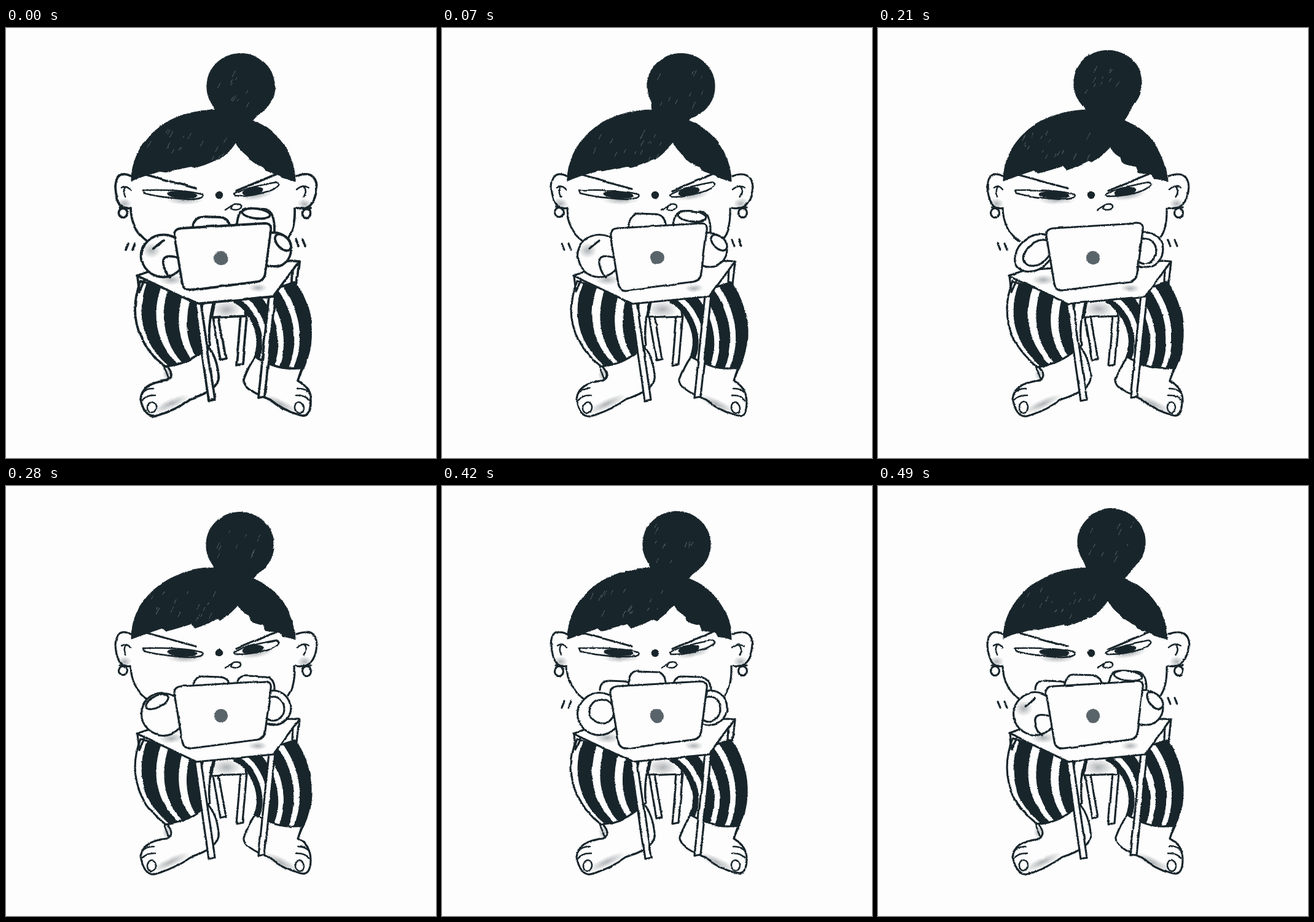
Animation of 700x700 px, one loop 560 ms. Source, as an HTML page:

```html
<!DOCTYPE html>
<html lang="en">
<head>
<meta charset="utf-8">
<title>Typing</title>
<style>
  html, body { margin: 0; width: 100%; height: 100%; overflow: hidden; background: #fdfdfd; }
  svg { display: block; width: 100vw; height: 100vh; }
  path, ellipse { fill: #fdfdfd; stroke: #18252b; stroke-width: var(--w, 3.2px); stroke-linecap: round; stroke-linejoin: round; }
  .line { fill: none; }
  .thin { stroke-width: 2.5px; }
  .ink { fill: #18252b; stroke-width: 1.2px; }
  .shade { fill: url(#smudge); stroke: none; }
  .fleck { fill: none; stroke: #a8b1b4; stroke-width: .9px; opacity: .5; }
  .badge { fill: #59646a; stroke: none; }
  .frame { visibility: hidden; animation: show 560ms step-end infinite; animation-delay: calc((var(--i) - 8) * 70ms); }
  @keyframes show { 0% { visibility: visible } 12.5%, 100% { visibility: hidden } }
</style>
</head>
<body>
<svg id="stage" viewBox="0 0 700 700">
  <radialGradient id="smudge">
    <stop offset="0" stop-color="#18252b" stop-opacity=".34"/>
    <stop offset="1" stop-color="#18252b" stop-opacity="0"/>
  </radialGradient>
</svg>
<script>
const path = (d, cls = '') => `<path class="${cls}" d="${d}"/>`;
const oval = (x, y, rx, ry, tilt = 0, cls = '') =>
  `<ellipse class="${cls}" cx="${x}" cy="${y}" rx="${rx}" ry="${ry}" transform="rotate(${tilt} ${x} ${y})"/>`;
const shade = (x, y, rx, ry, tilt) => oval(x, y, rx, ry, tilt, 'shade');
const range = n => [...Array(n).keys()];
const mix = (a, b, u) => a.map((v, k) => v + (b[k] - v) * u);
const polyline = points => 'M' + points.join('L');

function bezier([a, b, c, d], t) {
  const s = 1 - t;
  return a.map((_, k) => s * s * s * a[k] + 3 * s * s * t * b[k] + 3 * s * t * t * c[k] + t * t * t * d[k]);
}

function randomFrom(seed) {
  return () => (seed = seed * 16807 % 2147483647) / 2147483647;
}

// A straight furniture leg, drawn as a bar of constant width.
const bar = (x, top, foot, bottom, width) =>
  path(`M${x} ${top}L${foot} ${bottom}L${foot + width} ${bottom - 2}L${x + width} ${top}Z`);

// Striped trouser leg: each stripe lies between two blends of the outer and inner edge.
function trouserLeg(outer, inner, firstStripe) {
  const at = (u, t) => {
    const [x, y] = mix(bezier(outer, t), bezier(inner, t), u);
    return [x, y + 8 * t * Math.sin(Math.PI * u)];
  };
  const band = (u0, u1, cls) => {
    const steps = range(13).map(k => k / 12);
    const hem = steps.map(s => at(u0 + (u1 - u0) * s, 1));
    const back = steps.map(s => at(u1, 1 - s));
    return path(polyline([...steps.map(t => at(u0, t)), ...hem, ...back]) + 'Z', cls);
  };
  const stripes = range(4).map(k => firstStripe + .3 * k).map(u => band(u, Math.min(1, u + .185), 'ink'));
  return band(0, 1) + stripes.join('');
}

const trousers =
  trouserLeg([[219, 412], [202, 455], [206, 510], [259, 551]], [[338, 446], [332, 470], [329, 495], [332, 516]], .09) +
  trouserLeg([[470, 414], [496, 450], [506, 505], [484, 553]], [[372, 446], [395, 455], [420, 500], [405, 535]], .01);

const seat =
  bar(337, 470, 349, 541, 9) + bar(382, 468, 375, 550, 10) +
  path('M340 446L335 471L391 469L388 446') + shade(359, 458, 24, 14) +
  path('M257 551L266 574M484 553L474 576', 'thin') + shade(262, 563, 7, 12);

const toes =
  path('M222 594Q229 586 241 587M222 606Q228 597 243 598', 'line thin') +
  oval(237, 618, 7, 9, 10, 'thin') + shade(268, 612, 34, 8, -25);

const feet =
  path('M262 551Q276 567 262 574Q222 578 219 604Q225 634 242 632Q272 624 300 604Q350 588 346 565Q343 535 329 519') +
  path('M482 553L475 574Q496 586 496 608Q496 636 478 630Q450 622 430 605Q385 588 387 572Q395 550 405 536') +
  toes + `<g transform="translate(715 0) scale(-1 1)">${toes}</g>`;

const table =
  bar(307, 446, 330, 607, 10) + bar(428, 436, 411, 602, 10) +
  path('M214 404L217 429L225 411M477 381L473 417M467 393L466 413', 'line') +
  path('M213 403L240 394L465 379L477 380L435 437L310 449Z') +
  shade(269, 410, 20, 9) + shade(410, 423, 15, 7);

// An ear grows from its root on the face by a signed reach.
function ear(root, reach) {
  const x = f => root + reach * f;
  return path(`M${root} 241Q${x(.95)} 230 ${x(1)} 259Q${x(.9)} 298 ${root} 293`) +
    path(`M${x(.6)} 260Q${x(.3)} 254 ${root} 263M${x(.35)} 258Q${x(.55)} 265 ${x(.35)} 275`, 'line thin') +
    shade(x(.4), 286, 12, 9) + oval(x(.5), 301, 7, 7.5) +
    path(`M${x(.7)} 292L${x(.25)} 293`, 'line');
}

const face =
  path('M203 294Q204 328 230 347M470 294Q471 325 460 341', 'line') + ear(203, -25) + ear(473, 33) +
  shade(291, 280, 30, 8) + shade(408, 272, 28, 8, -10) +
  path('M225 238L309 261M375 265L440 238', 'line') +
  path('M223 264Q290 262 320 271Q324 278 300 279Q250 276 225 269Z', 'thin') + oval(287, 271.5, 24, 5.5, 4, 'ink') +
  path('M371 271Q385 261 440 251Q452 255 430 265Q400 275 373 274Z', 'thin') + oval(402, 266, 17, 6, -10, 'ink') +
  oval(347, 272, 5.6, 5.6, 0, 'ink') +
  path('M357 296L371 287Q383 285 382 292Q376 299 366 294L368 290', 'thin');

const laptop =
  path('M286 326L421 318Q433 318 431 330L422 399Q421 411 409 413L302 427Q289 428 287 416L274 338Q273 327 286 326Z') +
  oval(350, 374, 11, 11, 0, 'badge');

// The fringe follows two curves meeting at the parting; strands add a sawtooth.
function hair(parting, strand) {
  const right = [[471, 250], [440, 240], [396, 222], parting];
  const left = [parting, [340, 242], [270, 217], [204, 249]];
  const fringe = curve => range(29).map(k => {
    const t = k / 28;
    const [x, y] = bezier(curve, t);
    return [x, y + strand * (k % 7 / 6 - .4) * Math.sin(Math.PI * t)];
  });
  return path(`M204 249C204 190 255 134 345 133L375 146C420 146 470 190 471 250L${[...fringe(right), ...fringe(left)].join('L')}Z`, 'ink');
}

const bun = ([dx, dy]) => oval(382 + dx, 95 + dy, 55, 53.5, 0, 'ink') +
  path(`M${334 + dx} ${118 + dy}Q341 138 345 148L402 150Q408 142 ${425 + dx} ${128 + dy}Z`, 'ink');

// Pale pencil gaps left in the dark hair.
function flecks(seed, [dx, dy]) {
  const rnd = randomFrom(seed);
  return path(range(26).map(i => {
    const [x, y] = i < 10 ? [348 + dx + rnd() * 70, 62 + dy + rnd() * 60] : [235 + rnd() * 125, 165 + rnd() * 45];
    const length = 3 + rnd() * 8;
    return `M${x} ${y}l${-length / 2} ${length}`;
  }).join(''), 'fleck');
}

const finger = (x0, x1, top) =>
  path(`M${x0} 332Q${x0 + 1} ${top} ${x0 + 16} ${top}L${x1 - 16} ${top + 1}Q${x1 + 1} ${top + 3} ${x1} 332`);

// Fingers show above the lid by their lift; with none lifted the hands lie flat.
function hands({ left, right, grip, back }) {
  const flat = !left;
  const innerLeft = {
    thumb: path('M284 375Q250 364 257 388Q260 400 267 406M240 359L256 346', 'line') + shade(237, 362, 15, 13),
    nail: oval(246, 351, 20, 9, -28),
    loop: flat ? oval(260, 366, 26, 17, -40) : oval(260, 367, 20, 20)
  }[grip];
  const innerRight = grip === 'thumb' ? oval(451, 349, 16, 9.5, 46) : oval(435, 363, 18, 20);
  return (back ? finger(257, 312, 317) : '') +
    (left ? finger(303, 365, 322 - left) : '') +
    (right ? finger(375, 437, 318 - right) : '') +
    (right > 16 ? oval(407, 326 - right, 23, 8, 7) : '') +
    (flat ? oval(255, 366, 36, 26, -40) : oval(256, 371, 35.5, 34.5)) + innerLeft +
    oval(436, 361, 28, 28) + innerRight;
}

const ticks = (x, y, lean) => lean
  ? path(range(2).map(k => `M${x + k * 11 - 2 * lean} ${y - 5}l${4 * lean} 10`).join(''), 'line')
  : '';

const frames = [
  { left: 15, right: 24, grip: 'thumb', shake: [-1, 1], bun: [0, 0], width: 3.8 },
  { left: 20, right: 19, grip: 'thumb', shake: [1, 1], bun: [7, 0] },
  { left: 12, right: 9, grip: 'nail', shake: [0, 0], bun: [1, -2] },
  { left: 0, right: 0, grip: 'loop', shake: [1, 1], bun: [-8, -5] },
  { left: 12, right: 9, grip: 'nail', shake: [0, 0], bun: [-1, 1] },
  { left: 20, right: 19, grip: 'thumb', shake: [1, 1], bun: [3, 0] },
  { left: 21, right: 8, grip: 'loop', shake: [-1, 0], bun: [0, 0], back: true },
  { left: 15, right: 17, grip: 'thumb', shake: [1, 1], bun: [-2, -4], back: true }
];

// Opaque noise keeps the displacement centred, so lines roughen without drifting.
const roughen = (input, frequency, seed, scale) => `
  <feTurbulence type="fractalNoise" baseFrequency="${frequency}" numOctaves="2" seed="${seed}"/>
  <feColorMatrix values="1 0 0 0 0  0 1 0 0 0  0 0 1 0 0  0 0 0 0 1" result="noise${seed}"/>
  <feDisplacementMap in="${input}" in2="noise${seed}" scale="${scale}" xChannelSelector="R" yChannelSelector="G" result="rough"/>`;

stage.insertAdjacentHTML('beforeend', frames.map((pose, i) => {
  const { grip, shake, bun: bob, width = 3.2 } = pose;
  const top = grip === 'thumb' ? hair([374, 186], 3) : hair([378, 193], 8);
  return `
    <filter id="pencil${i}" filterUnits="userSpaceOnUse" x="0" y="0" width="700" height="700" color-interpolation-filters="sRGB">
      ${roughen('SourceGraphic', .025, i + 3, 3)}${roughen('rough', .5, i + 20, 2.4)}
    </filter>
    <g class="frame" style="--i:${i};--w:${width}px" filter="url(#pencil${i})">
      ${seat}${feet}${trousers}${table}${face}
      ${bun(bob)}${top}${flecks(i * 97 + 1311, bob)}
      ${hands(pose)}${ticks(197, 356, shake[0])}${ticks(474, 350, shake[1])}${laptop}
    </g>`;
}).join(''));
</script>
</body>
</html>
```
